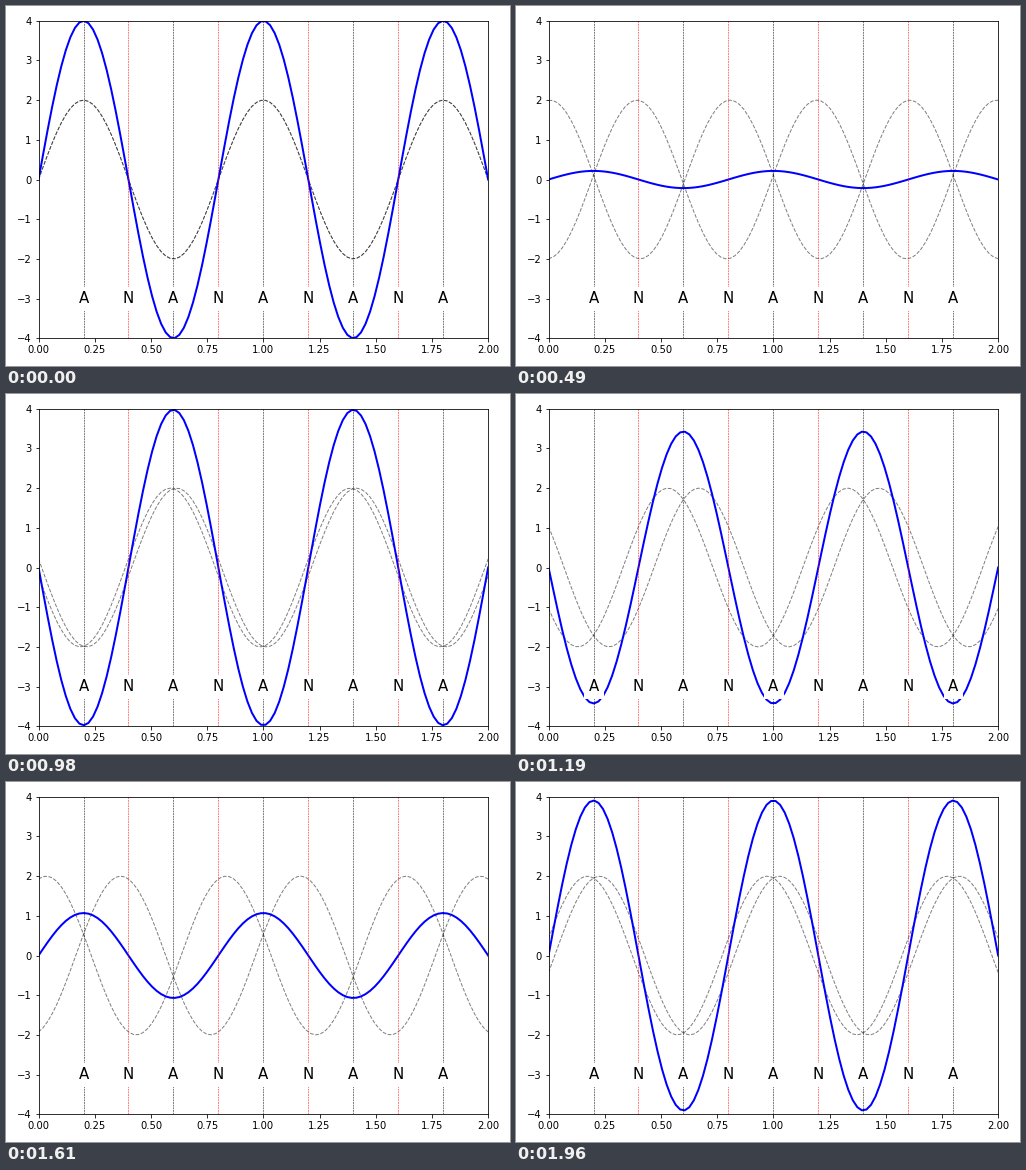
Write a matplotlib script that moves like this. It is 504x360 px and loops after 2030 ms.

```python
import numpy as np
import matplotlib.pyplot as plt
from matplotlib.animation import FuncAnimation

FRAMES = 29
INTERVAL = 70
WAVELENGTH = 0.8
AMPLITUDE = 2

x = np.linspace(0, 2, 100)
k = 2 * np.pi / WAVELENGTH

fig, ax = plt.subplots(figsize=(7, 5), dpi=72)
ax.set_xlim(0, 2)
ax.set_ylim(-4, 4)

right_wave, = ax.plot([], [], "k--", lw=1, alpha=0.5)
left_wave, = ax.plot([], [], "k--", lw=1, alpha=0.5)
standing_wave, = ax.plot([], [], "b", lw=2)

# Antinodes and nodes alternate every quarter wavelength.
for i in range(1, 10):
    pos = i * WAVELENGTH / 4
    label, color = ("A", "k") if i % 2 else ("N", "r")
    ax.axvline(pos, color=color, ls="--", lw=0.5)
    ax.text(pos, -3, label, size=15, ha="center", va="center",
            bbox=dict(facecolor="white", edgecolor="white"))

fig.tight_layout()


def update(frame):
    phase = 2 * np.pi * frame / FRAMES
    y_right = AMPLITUDE * np.sin(k * x - phase)
    y_left = AMPLITUDE * np.sin(k * x + phase)
    right_wave.set_data(x, y_right)
    left_wave.set_data(x, y_left)
    standing_wave.set_data(x, y_right + y_left)
    return right_wave, left_wave, standing_wave


anim = FuncAnimation(fig, update, frames=FRAMES, interval=INTERVAL, repeat=True)
plt.show()
```
